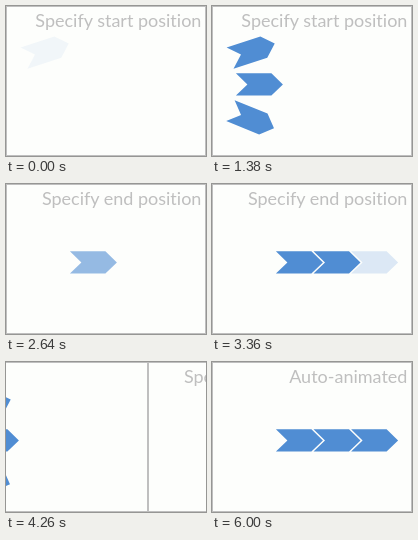
An HTML page that plays this animation: 200x150 px, repeating every 6420 ms.

```html
<!DOCTYPE html>
<html lang="en">
<head>
<meta charset="utf-8">
<title>Auto-animated arrows</title>
<style>
  html, body { margin: 0; width: 100%; height: 100%; overflow: hidden; background: #fdfefc; }
  svg { display: block; width: 100%; height: 100%; }
  .page { fill: #fdfefc; stroke: #bfbfbf; }
  .arrow { fill: #508dd3; }
  text {
    font: 18px Lato, "Open Sans", sans-serif;
    font-variant-ligatures: none;
    text-anchor: end;
    fill: #bfbfbf;
  }
</style>
</head>
<body>
<svg id="stage" viewBox="0 0 200 150"></svg>
<script>
const LOOP = 6420, STEP = 60, FADE = 452;
const PUSH = 856, MOVE_START = 5410, MOVE = 585;

// Arrow poses: centre x, centre y, rotation
const START = [[40.4, 44.8, -18], [47.4, 78.4, 0], [40.2, 113.5, 22]];
const END = [[87.4, 78.4, 0], [125, 78.4, 0], [162.6, 78.4, 0]];
const SHAPE = "M-23.5-11.2H12L23.5 0 12 11.2H-23.5L-12 0Z";

const stage = document.getElementById("stage");

function add(parent, tag, attrs) {
  const el = document.createElementNS("http://www.w3.org/2000/svg", tag);
  for (const key in attrs) el.setAttribute(key, attrs[key]);
  return parent.appendChild(el);
}

function pose(el, [x, y, angle]) {
  el.setAttribute("transform", `translate(${x} ${y}) rotate(${angle})`);
}

function makeSlide(label, poses) {
  const group = add(stage, "g");
  add(group, "rect", { class: "page", x: 0.5, y: 0.5, width: 199, height: 149 });
  const title = add(group, "text", { x: 195.4, y: 21 });
  title.textContent = label;
  const arrows = poses.map(p => {
    const arrow = add(group, "path", { class: "arrow", d: SHAPE });
    pose(arrow, p);
    return arrow;
  });
  return { group, title, arrows };
}

const first = makeSlide("Specify start position", START);
const second = makeSlide("Specify end position", END);
const last = makeSlide("Auto-animated", START);

const progress = (t, start, length) => Math.min(1, Math.max(0, (t - start) / length));
const sine = u => (1 - Math.cos(Math.PI * u)) / 2;
const push = (t, start) => sine(progress(t, start, PUSH) ** 0.75);
const mix = (a, b, u) => a.map((v, i) => v + (b[i] - v) * u);

// Slides move by whole pixels so their borders stay crisp
function place(slide, x) {
  slide.group.setAttribute("transform", `translate(${Math.round(x)} 0)`);
  slide.group.style.display = Math.abs(x) < 200 ? "" : "none";
}

function fadeArrows(slide, t, start) {
  slide.arrows.forEach((arrow, i) => {
    arrow.style.opacity = progress(t, start + i * FADE, FADE);
  });
}

function draw(t) {
  const out = push(t, 1380);
  const back = push(t, 3790);
  place(first, -200 * out);
  place(second, 200 * (1 - out + back));
  place(last, -200 * (1 - back));

  fadeArrows(first, t, -30);
  fadeArrows(second, t, 2370);
  last.title.style.opacity = progress(t, 4800, 500);

  const u = sine(progress(t, MOVE_START, MOVE));
  last.arrows.forEach((arrow, i) => pose(arrow, mix(START[i], END[i], u)));
}

function tick() {
  const t = performance.now() % LOOP;
  draw(Math.floor(t / STEP) * STEP);
  requestAnimationFrame(tick);
}

draw(0);
tick();
</script>
</body>
</html>
```
